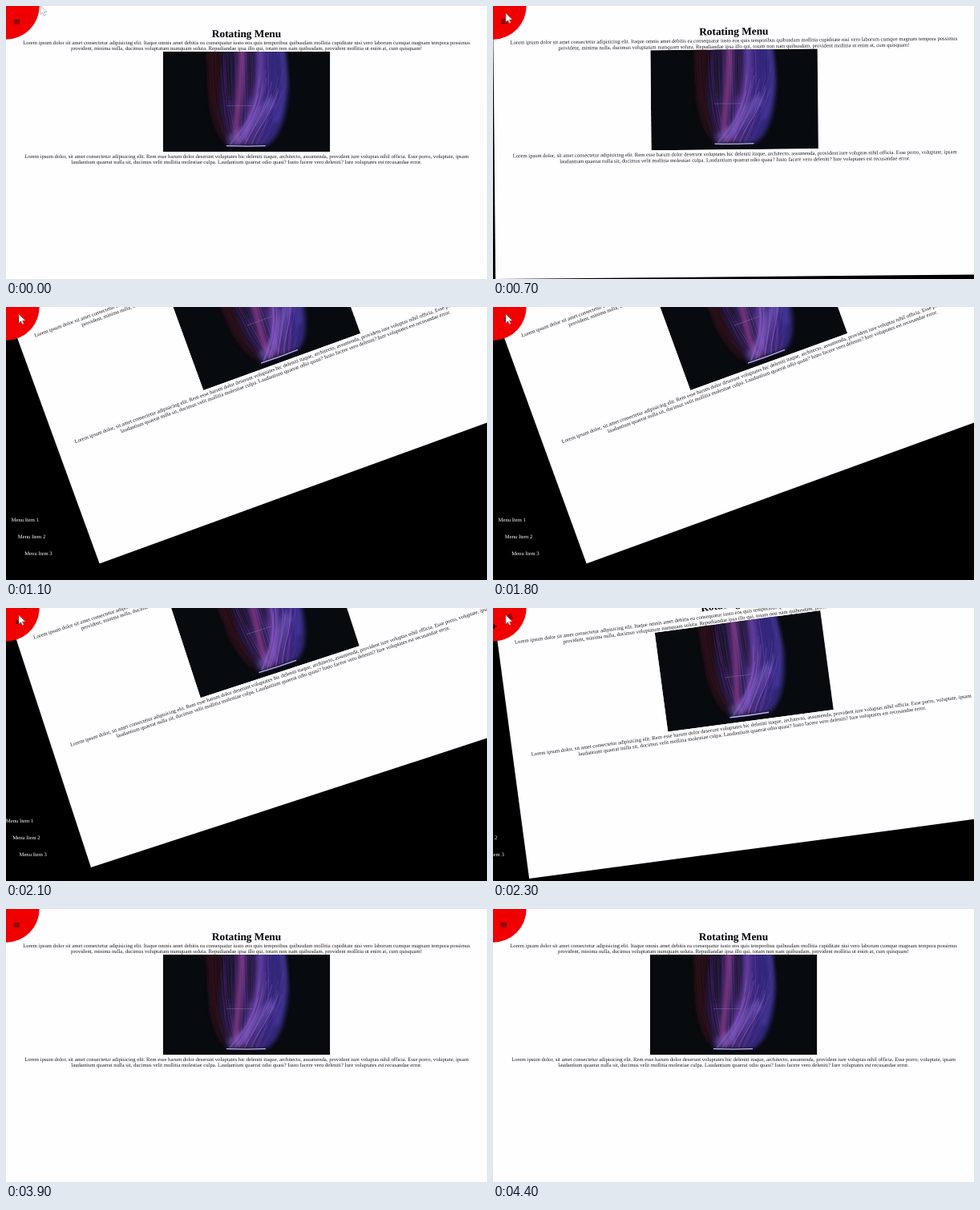
These frames come from a looping animation (600x341 px, 4.9 s). An HTML page:

```html
<!DOCTYPE html>
<html lang="en">
<head>
<meta charset="utf-8">
<title>Rotating Menu</title>
<style>
  html, body { margin: 0; width: 100%; height: 100%; overflow: hidden; background: #000; }
  svg { display: block; width: 100%; height: 100%; }
  text { font: 16px "Liberation Serif", "Times New Roman", serif; text-rendering: geometricPrecision; }
  .copy { fill: #1c1c1c; text-anchor: middle; }
  .title { font-size: 32px; font-weight: bold; fill: #000; }
  .menu { fill: #fff; }
</style>
</head>
<body>
<svg viewBox="0 0 1440 818.4" preserveAspectRatio="none">
  <defs>
    <linearGradient id="flame">
      <stop offset="0" stop-color="#1b1638"/>
      <stop offset=".25" stop-color="#2a1c4c"/>
      <stop offset=".55" stop-color="#38286e"/>
      <stop offset=".8" stop-color="#31287a"/>
      <stop offset="1" stop-color="#201c50"/>
    </linearGradient>
    <filter id="soft" x="-50%" y="-50%" width="200%" height="200%"><feGaussianBlur stdDeviation="2.5"/></filter>
    <clipPath id="frame"><path d="M0 0H208.3V125H0z"/></clipPath>
  </defs>

  <g id="menu" class="menu">
    <text x="15.6" y="643">Menu Item 1</text>
    <text x="35.6" y="693">Menu Item 2</text>
    <text x="55.6" y="743">Menu Item 3</text>
  </g>

  <g id="page">
    <path d="M0 0H1440V818.4H0z" fill="#fefdff"/>
    <g class="copy">
      <text class="title" x="720" y="93">Rotating Menu</text>
      <text x="720" y="115">Lorem ipsum dolor sit amet consectetur adipisicing elit. Itaque omnis amet debitis ea consequatur iusto eos quis temporibus quibusdam mollitia cupiditate nisi vero laborum cumque magnam tempora possimus</text>
      <text x="720" y="133">provident, minima nulla, ducimus voluptatum numquam soluta. Repudiandae ipsa illo qui, totam non nam quibusdam, provident mollitia ut enim at, cum quisquam!</text>
      <text x="720" y="455">Lorem ipsum dolor, sit amet consectetur adipisicing elit. Rem esse harum dolor deserunt voluptates hic deleniti itaque, architecto, assumenda, provident iure voluptas nihil officia. Esse porro, voluptate, ipsam</text>
      <text x="720" y="473">laudantium quaerat nulla sit, ducimus velit mollitia molestiae culpa. Laudantium quaerat odio quasi? Iusto facere vero deleniti? Iure voluptates est recusandae error.</text>
    </g>
    <g transform="translate(470 137) scale(2.4)" clip-path="url(#frame)">
      <path d="M0 0H209V125H0z" fill="#070a0e"/>
      <path d="M54 -5H72L76 116Q60 95 56 60z" fill="#220c14" filter="url(#soft)"/>
      <path d="M78 -5C72 30 66 60 72 82Q76 104 78 117H130C147 106 157 75 157 40L152 -5z" fill="url(#flame)" filter="url(#soft)"/>
      <g fill="none" filter="url(#soft)">
        <path d="M110 -5Q108 25 113 60" stroke="#0b0a18" stroke-width="10" opacity=".8"/>
        <path d="M86 -5Q80 30 82 58" stroke="#0d0c1e" stroke-width="9" opacity=".7"/>
        <path d="M98 -5Q98 35 93 75T98 112" stroke="#96408e" stroke-width="6" opacity=".85"/>
        <path d="M122 -5Q124 35 112 72T104 112" stroke="#7248b0" stroke-width="7" opacity=".8"/>
        <path d="M148 -5Q158 45 141 88" stroke="#5644b4" stroke-width="6" opacity=".6"/>
        <path d="M82 112Q102 104 116 84T138 62" stroke="#7a62c8" stroke-width="13" opacity=".5"/>
      </g>
      <g id="strands" fill="none"></g>
      <path d="M79 67.5H112" stroke="#8f78c0" stroke-width=".6" opacity=".7"/>
      <path d="M78 116.5H130" stroke="#6c5cd0" stroke-width="5" opacity=".5" filter="url(#soft)"/>
      <path d="M79 117.6Q104 118.4 128 117.6" stroke="#bdb2f4" stroke-width="1.3" fill="none"/>
    </g>
  </g>

  <g id="dial">
    <circle r="100" fill="#f00000"/>
    <path d="M23 41.5h18M23 47h18M23 52.5h18" stroke="#2a0000" stroke-width="2.4"/>
    <path transform="translate(-22 51) rotate(70)" d="M-5 -5L5 5M-5 5L5 -5" stroke="#1a0000" stroke-width="3.6"/>
  </g>

  <path id="cursor" d="M0 0V11L2.6 8.6L4.4 12.6L6.2 11.8L4.4 7.9H8z" fill="#fff" stroke="#777" stroke-width=".5"/>
</svg>

<script>
  const LOOP = 4900, STEP = 100, SCALE = 2.4;
  const TURN = 20, DIAL_TURN = 70, MENU_SHIFT = 170;
  const OPEN_AT = 690, CLOSE_AT = 2064, SPAN = 381;
  const $ = id => document.getElementById(id);
  const clamp = v => Math.max(0, Math.min(1, v));

  // time, x, y of the pointer tip
  const track = [[0, 43, -.5], [100, 34, 3], [200, 23, 7], [300, 16, 9], [2400, 16, 9], [2500, 40, -5], [2900, 38, -9]];
  const POINTER_GONE = 3900;

  function drawStrands() {
    let seed = 7;
    const rnd = () => (seed = (seed * 16807) % 2147483647) / 2147483647;
    const strand = (d, hue, light, alpha) =>
      `<path d="${d}" stroke="hsl(${hue} 50% ${light}%)" stroke-width="${.3 + rnd() * .5}" opacity="${alpha}"/>`;
    let out = '';
    // upright threads, red at the left edge and blue at the right
    for (let i = 0; i < 60; i++) {
      const u = rnd(), wob = rnd() * 16 - 8;
      const top = 56 + 98 * u, mid = 58 + 98 * u, end = 78 + 50 * u;
      const hue = u < .15 ? 350 : 300 - 55 * u;
      out += strand(`M${top} -2C${mid - wob} 40 ${mid + wob} 85 ${end} ${98 + 19 * rnd()}`,
        hue, u < .15 ? 22 : 35 + 22 * rnd(), .15 + .35 * rnd());
    }
    // threads fanning from the base to the right
    for (let i = 0; i < 30; i++) {
      const u = rnd();
      out += strand(`M${82 + 40 * u} 116C${100 + 25 * u} 95 ${112 + 30 * u} ${90 - 20 * rnd()} ${118 + 36 * u} ${20 + 40 * rnd()}`,
        255 + 25 * rnd(), 50 + 18 * rnd(), .15 + .35 * rnd());
    }
    $('strands').innerHTML = out;
  }

  function pointerAt(t) {
    let i = track.length - 1;
    while (track[i][0] > t) i--;
    return track[i];
  }

  function draw(now) {
    const t = Math.floor((now % LOOP) / STEP) * STEP;
    const open = clamp((t - OPEN_AT) / SPAN) - clamp((t - CLOSE_AT) / SPAN);
    $('page').setAttribute('transform', `rotate(${-TURN * open})`);
    $('dial').setAttribute('transform', `rotate(${-DIAL_TURN * open})`);
    $('menu').setAttribute('transform', `translate(${-MENU_SHIFT * (1 - open)} 0)`);
    const [, x, y] = pointerAt(t);
    $('cursor').setAttribute('transform', `scale(${SCALE}) translate(${x} ${y})`);
    $('cursor').setAttribute('visibility', t < POINTER_GONE ? 'visible' : 'hidden');
  }

  drawStrands();
  const start = performance.now();
  (function tick() {
    draw(performance.now() - start);
    requestAnimationFrame(tick);
  })();
</script>
</body>
</html>
```
